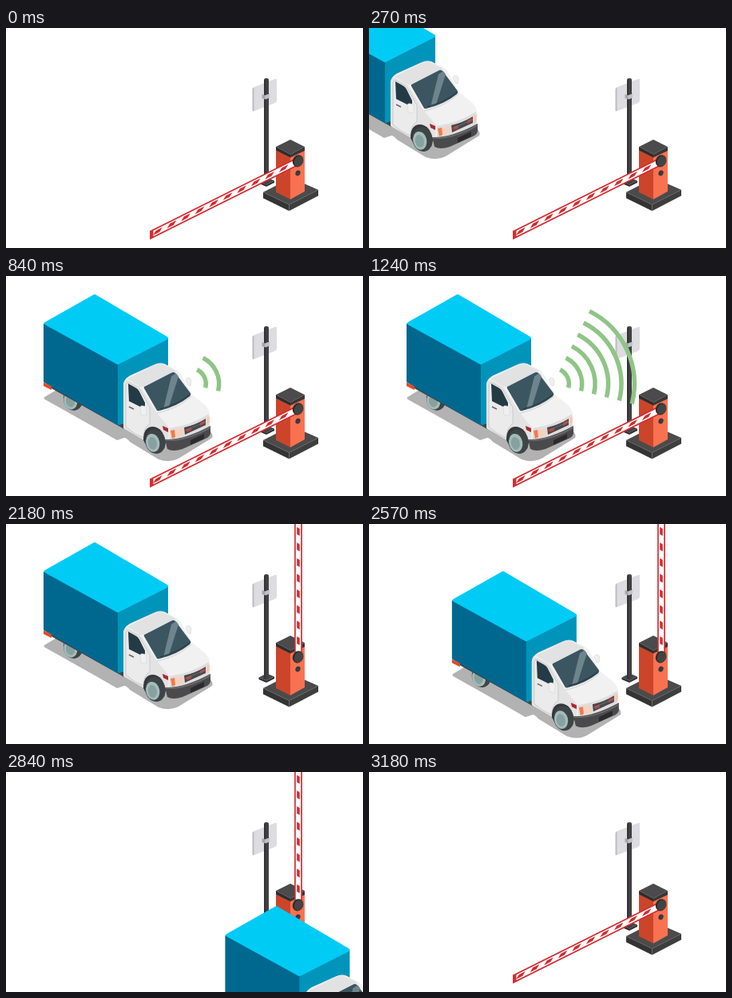
Recreate the animation shown at these times as an HTML page. Size 447 by 276 pixels, loop 3880 ms.

```html
<!DOCTYPE html>
<html lang="en">
<head>
<meta charset="utf-8">
<title>Barrier</title>
<style>
  html, body { margin: 0; height: 100%; overflow: hidden; background: #fff; }
  svg { display: block; width: 447px; height: 276px; }
  .round { stroke-width: 4; stroke-linejoin: round; }
</style>
</head>
<body>
<svg viewBox="0 0 447 276">
  <g id="sign">
    <path d="M316.500 192.500l10-5 9.500 4-10 5z" fill="#48484a"/>
    <path d="M316.500 192.500l9.500 4v2.500l-9.500-4zM326 196.500l10-5v2.500l-10 5z" fill="#2e2e30"/>
    <path d="M309 77q0-2 2-3l26-10q2-1 2 1v26q0 2-2 3l-26 10q-2 1-2-1z" fill="#dcdce1"/>
    <path d="M308.500 77q0-2 2-2.500v29.500q-2 1-2-1z" fill="#bcbcc2"/>
    <path d="M323 65q0-2 3-2t3 2v129l-3 1.500-3-1.500z" fill="#414144"/>
    <path d="M323 65l2 1v129l-2-1z" fill="#333336"/>
    <path d="M320.500 83l4 1.500 5.500-2v5l-5.500 2-4-1.500z" fill="#a5a5aa"/>
    <path d="M324.500 84.500l5.500-2v5l-5.500 2z" fill="#c2c2c6"/>
  </g>

  <g id="post">
    <path d="M322 206l35-18 34 15-36.500 18.500z" fill="#4b4b4b"/>
    <path d="M322 206l32.500 15.500v8L322 213.500z" fill="#343434"/>
    <path d="M354.500 221.500L391 203v7.500l-36.500 19z" fill="#3e3e3e"/>
    <path d="M322 206l32.500 15.500L391 203" fill="none" stroke="#666" stroke-width=".7"/>
    <path d="M338 153l18 9v53l-18-9z" fill="#cc452b"/>
    <path d="M356 162l18-9v52l-18 10z" fill="#f87252"/>
    <path d="M338 149l18-9 18 9-18 9.500z" fill="#4b4b4b"/>
    <path d="M338 149l18 9.500v4l-18-9z" fill="#2d2d2d"/>
    <path d="M356 158.500l18-9.500v5l-18 8.500z" fill="#373737"/>
    <ellipse cx="365.500" cy="182" rx="3" ry="3.600" transform="rotate(25 365.500 182)" fill="#3a3a3a"/>
  </g>
  <g id="arm">
    <path d="M2-5.500H208V5.500H2z" fill="#d42c30"/>
    <path d="M4-3.600H203V3.600H4z" fill="#fff"/>
    <path id="stripes" fill="#d42c30"/>
  </g>
  <g transform="rotate(25 366 167)">
    <ellipse cx="365.500" cy="167" rx="6.500" ry="7.800" fill="#292929"/>
    <ellipse cx="366.500" cy="167" rx="5.500" ry="7" fill="#434343"/>
  </g>

  <g id="truck">
    <path d="M48 152l15-9 90 40 102 11q5 5 3 9l-42 26q-11 6-25 1l-36-22q-4-5-7-5l-9 3-26-15-64-36q-2-1-1-3z" fill="#b2b2b2"/>
    <g transform="rotate(-12 83 155)">
      <ellipse cx="84" cy="155" rx="12" ry="14" fill="#3f4547"/>
      <ellipse cx="80.500" cy="156" rx="8.500" ry="11" fill="#a3bcbb"/>
      <ellipse cx="80" cy="156.500" rx="5.500" ry="7.500" fill="#86a19f"/>
    </g>
    <path d="M56 137l92 49v6L57 141z" fill="#3a474d"/>
    <path class="round" d="M49 61l91 50v74L49 132z" fill="#00688f" stroke="#00688f"/>
    <path class="round" d="M142 112l59-33v78l-59 28z" fill="#0094bb" stroke="#0094bb"/>
    <path class="round" d="M50 59.500L111 25l90 53-61 31z" fill="#00cbf5" stroke="#00cbf5"/>
    <path d="M47 133.500l10 5v4.500l-10-5z" fill="#e24a24"/>

    <path d="M147 136q0-6 8-11l31-14q6-3 12-1l14 7q5 2 8 8l12 23 15 12q8 6 8 15v16l-52 21-30-6-26-16z" fill="#f1f1f1"/>
    <path d="M152 129l34-17q6-3 11-1l14 7q3 2 0 3l-38 18q-4 1-8-2z" fill="#e2e2e2"/>
    <path d="M147 136q1-6 6-5l11 6q5 2 8 8l17 27 15 18-1 19-30-3-26-15z" fill="#e3e3e3"/>
    <path d="M150 189v-52q1-4 4-3l9 5q4 2 7 8l10 18v20q-8 6-8 18l-12-6z" fill="#ebebeb" stroke="#c4c4c4" stroke-width=".8"/>
    <path d="M153 135l9 5q4 2 6 7l6 12v8l-20-10z" fill="#243b46"/>
    <path d="M154 164l6 3" stroke="#666" stroke-width="1.500"/>
    <path d="M173 141q-1-2 2-3l33-17q3-1 5 2l18 24q1 2-1 4-16 13-38 18-3 1-4-2z" fill="#3b5661"/>
    <path d="M197 167l7-3 12-38-3-4-6 4z" fill="#6e858d"/>
    <path d="M193 167q22-6 37-18" fill="none" stroke="#293d45" stroke-width="1.500"/>
    <path d="M189 172q25-5 43-21" fill="none" stroke="#d2d2d2"/>
    <path d="M205 191q27-4 49-18l1 17-50 21z" fill="#dedede"/>
    <path d="M223 190q14-3 27-11v8l-26 12z" fill="#47484b"/>
    <path d="M226 192l6-2v4l-6 2zM243 184l6-3v4l-6 3z" fill="#b94343"/>
    <path d="M224 194l26-11" stroke="#777" stroke-width=".8"/>
    <path d="M206 194l16-3v9l-14 4q-2-5-2-10z" fill="#f5d2c0"/>
    <path d="M206 194l5-1 1 9-4 2z" fill="#f17b4d"/>
    <path d="M251 178l4-2v8l-4 3z" fill="#f5cbb8"/>
    <path d="M196 188l7 3v5l-6-3z" fill="#a72b31"/>
    <path d="M199 205q24 1 57-17v10q-1 3-4 5l-31 14q-12 4-19 0z" fill="#4a4a4c"/>
    <path d="M200 206q26 1 56-16" fill="none" stroke="#6d6d6f" stroke-width="1.500"/>
    <path d="M231 206l17-8v6l-17 8z" fill="#2b2b2d"/>
    <path d="M172 206q0-17 12-17 13 1 16 20l-2 8h-20z" fill="#34383a"/>
    <g transform="rotate(-12 185 208)">
      <ellipse cx="187" cy="208" rx="12.500" ry="15.500" fill="#3f4547"/>
      <ellipse cx="183.500" cy="209" rx="8.500" ry="11.500" fill="#a3bcbb"/>
      <ellipse cx="183" cy="209.500" rx="5.500" ry="8" fill="#86a19f"/>
    </g>
    <path d="M168 165q0-3 4-2l4 1v9q0 3-3 2l-4-1zM225 130q2-3 5-2 2 1 2 4l-1 6-3-1z" fill="#f0f0f0" stroke="#d6d6d6" stroke-width=".6"/>
  </g>

  <g id="waves" fill="none" stroke="#8fc586" stroke-width="5.500"></g>
</svg>
<script>
const $ = id => document.getElementById(id);
const LOOP = 3880, STEP = 30, WAVES = 6;
const clamp = (v, lo, hi) => Math.max(lo, Math.min(hi, v));
const stepsSince = (t, start) => Math.floor((t - start) / STEP);

let stripes = '';
for (let u = 14; u < 198; u += 19.6) stripes += `M${u} 2h9l4-4h-9z`;
$('stripes').setAttribute('d', stripes);

const polar = (r, deg) => {
  const a = deg * Math.PI / 180;
  return `${230.3 + r * Math.cos(a)} ${135.3 + r * Math.sin(a)}`;
};
for (let i = 0; i < WAVES; i++) {
  const r = 20 + 16.4 * i;
  $('waves').innerHTML += `<path d="M${polar(r, -63.4)}A${r} ${r} 0 0 1 ${polar(r, 14.2)}"/>`;
}

function moveTruck(t) {
  const arriving = Math.min(0, stepsSince(t, 510));
  const leaving = Math.max(0, stepsSince(t, 2480));
  const x = 15 * arriving + 18.95 * leaving;
  const y = 8.5 * arriving + 12.1 * leaving;
  $('truck').setAttribute('transform', `translate(${x} ${y})`);
  $('truck').style.display = t < 30 || t >= 3180 ? 'none' : '';
}

// The arm turns in the slanted vertical plane of the barrier.
function turnArm(t) {
  const lift = t < 3050
    ? clamp(stepsSince(t, 1880), 0, 10) / 10
    : Math.max(0, 2 - Math.floor((t - 3050) / 65)) / 3;
  const c = Math.cos(lift * Math.PI / 2), s = Math.sin(lift * Math.PI / 2);
  $('arm').setAttribute('transform',
    `matrix(${-.894 * c} ${.447 * c - s} ${.894 * s} ${-.447 * s - c} 366 167)`);
}

function showWaves(t) {
  const count = t < 840 || t >= 1910 ? 0 : 2 + Math.floor((t - 840) / 100);
  [...$('waves').children].forEach((wave, i) => {
    wave.style.display = i < count ? '' : 'none';
  });
}

const start = performance.now();
function draw() {
  const t = (performance.now() - start) % LOOP;
  moveTruck(t);
  turnArm(t);
  showWaves(t);
  requestAnimationFrame(draw);
}
draw();
</script>
</body>
</html>
```
